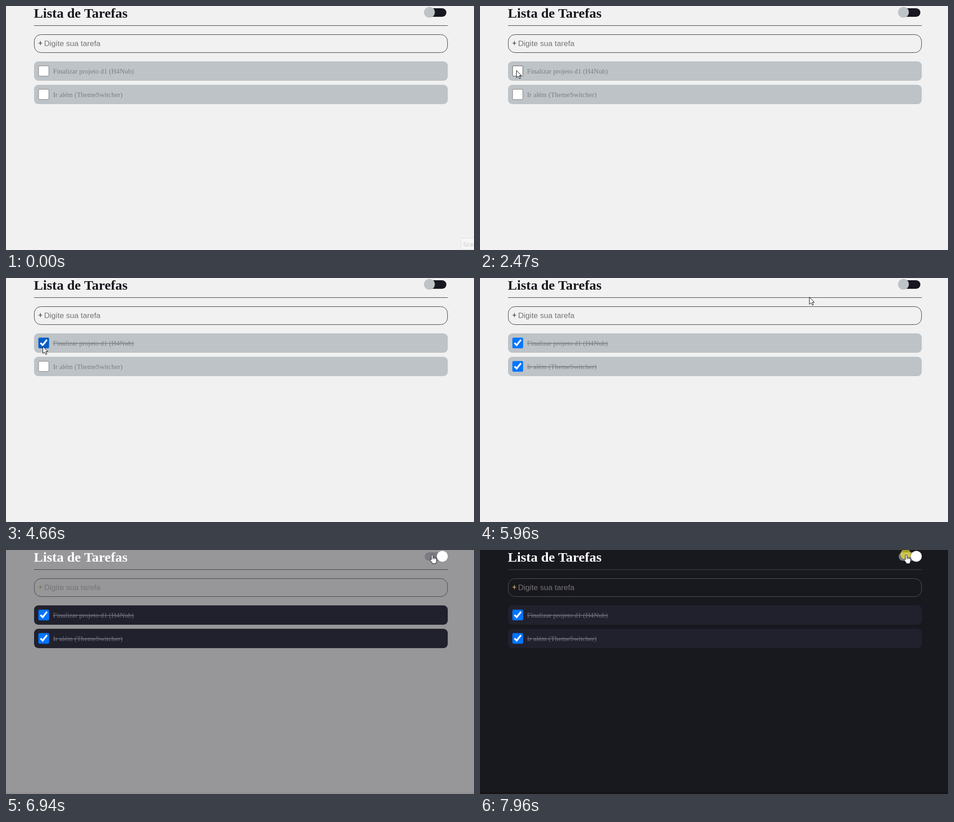
Animation of 1034x542 px, one loop 8 s. Source, as an HTML page:

```html
<!DOCTYPE html>
<html lang="pt-BR">
<head>
<meta charset="utf-8">
<title>Lista de Tarefas</title>
<style>
  html, body { margin: 0; width: 100%; height: 100%; overflow: hidden; background: #f1f1f1; }
  svg { display: block; width: 1034px; height: 542px; }
  text { font-family: "Liberation Serif", "Times New Roman", serif; white-space: pre; }
  .sans { font-family: "Liberation Sans", Arial, sans-serif; }
  .hint { font-family: "Open Sans", sans-serif; }
</style>
</head>
<body>
<svg viewBox="0 0 1034 542">
  <rect id="page" width="1034" height="542"/>
  <rect id="edge" y="538" width="1034" height="4" fill="#131318"/>
  <text id="title" x="61.5" y="26" font-size="30.4" font-weight="bold">Lista de Tarefas</text>
  <rect id="rule" x="62" y="43" width="914" height="1"/>
  <rect id="track" x="925" y="5" width="48" height="19" rx="9.5"/>
  <circle id="knob" cy="14" r="12"/>
  <rect id="field" x="62.5" y="63.5" width="913" height="40" rx="15" fill="none"/>
  <text id="plus" x="71" y="88" font-size="17.1" stroke-width=".4">+</text>
  <text class="sans" x="84.2" y="88.5" font-size="17.1" fill="#757575">Digite sua tarefa</text>
  <g id="rows"></g>
  <g id="hint">
    <rect x="1005.5" y="515.5" width="40" height="26" fill="#f6f6f6" stroke="#dedede"/>
    <text class="hint" x="1010.5" y="534" font-size="12" fill="#c4c4c4">Grav</text>
  </g>
  <circle id="press" r="11.5" fill="#fff228" fill-opacity=".62"/>
  <g id="cursor" stroke="#000" stroke-linejoin="round">
    <path id="arrow" d="M.5.5V16.5L4.3 13 7 18.6 9.4 17.5 6.8 12H11.6Z"/>
    <path id="hand" fill="#fff" d="M-.2 12.2V2.5Q1.5-.8 3.3 2.5V7Q5.5 6 6.2 7.7 8.2 7 8.9 8.6 11.4 8.2 11.4 10.4V14.5Q11.4 17 9.8 19V20.8H1.6V19L-3.3 12.5Q-3.4 9-.2 12.2ZM3.3 7V11M6.2 8V11M8.9 9V11"/>
  </g>
</svg>
<script>
const LOOP = 8000, PRESS = 170, RELEASE = 130;
const $ = id => document.getElementById(id);
const set = (el, attrs) => { for (const k in attrs) el.setAttribute(k, attrs[k]); };
const show = (el, on) => el.setAttribute('visibility', on ? 'visible' : 'hidden');
const clamp = v => Math.min(1, Math.max(0, v));
const mix = (a, b, p) => a + (b - a) * p;
const blend = (a, b, p) => `rgb(${a.map((v, i) => Math.round(mix(v, b[i], p)))})`;
const smooth = u => u * u * (3 - 2 * u);
const slowDown = u => 1 - (1 - u) ** 2;

// CSS "ease": cubic-bezier(.25, .1, .25, 1), solved by bisection
function ease(x) {
  if (x <= 0 || x >= 1) return clamp(x);
  let lo = 0, hi = 1, s;
  for (let i = 0; i < 20; i++) {
    s = (lo + hi) / 2;
    if (.75 * s * (1 - s) + s ** 3 < x) lo = s; else hi = s;
  }
  return .3 * s * (1 - s) ** 2 + 3 * s * s * (1 - s) + s ** 3;
}

const entry = { x: 1030, y: 500 };
const list = { x: 108, y: 95 };
const first = { x: 80, y: 142, clicks: [1590, 2270, 4330] };
const second = { x: 86, y: 200, clicks: [2860, 3480, 5200] };
const toggle = { x: 940, y: 9.5, clicks: [6558, 7960] };
const targets = [first, second, toggle];
const THEME_START = toggle.clicks[0] + RELEASE;

// Each move starts where the last one ended; bow bends its path
const moves = [
  { from: 70, until: 830, to: list },
  { from: 830, until: 1390, to: first, bowX: -32 },
  { from: 2450, until: 2800, to: second },
  { from: 3660, until: 4240, to: first, bowY: -30 },
  { from: 4520, until: 5070, to: second },
  { from: 5400, until: 6520, to: toggle, bowY: -15, pace: slowDown }
];

function pointer(t) {
  let { x, y } = entry;
  for (const { from, until, to, bowX = 0, bowY = 0, pace = smooth } of moves) {
    const u = clamp((t - from) / (until - from)), bow = Math.sin(Math.PI * u);
    x = mix(x, to.x, pace(u)) + bowX * bow;
    y = mix(y, to.y, pace(u)) + bowY * bow;
  }
  return { x, y };
}

const isPressed = t => targets.some(p => p.clicks.some(c => t >= c && t < c + PRESS));
const isOn = (target, t) => target.clicks.filter(c => t >= c + RELEASE).length % 2 === 1;

const rows = [
  { top: 123, label: 'Finalizar projeto d1 (H4Nub)', target: first },
  { top: 175, label: 'Ir além (ThemeSwitcher)', target: second }
];
for (const row of rows) {
  const g = document.createElementNS('http://www.w3.org/2000/svg', 'g');
  g.setAttribute('transform', `translate(62 ${row.top})`);
  g.innerHTML = `<rect width="914" height="43" rx="9.5"/>
    <rect x="10" y="10" width="22.75" height="22.75" rx="2"/>
    <path d="M14.25 21.4L19 26.1 28.5 14.25" fill="none" stroke="#fff" stroke-width="3.8"/>
    <text x="42" y="27" font-size="15.2">${row.label}</text>`;
  $('rows').append(g);
  [row.card, row.box, row.tick, row.text] = g.children;
}

function drawRow(row, t, { x, y }, pressed, dark) {
  const checked = isOn(row.target, t);
  const hover = Math.abs(x - 83) < 12 && Math.abs(y - row.top - 21.5) < 12;
  const blue = !hover ? '#0075ff' : pressed ? '#3793ff' : '#005cc8';
  const border = hover ? '#4f4f4f' : '#767676';
  set(row.card, { fill: dark ? '#21212d' : '#bdc3c7' });
  set(row.box, { fill: checked ? blue : '#fff', stroke: checked ? blue : border });
  show(row.tick, checked);
  set(row.text, {
    fill: dark ? '#72727e' : '#777f80',
    'text-decoration': checked ? 'line-through' : 'none'
  });
}

function draw(t) {
  const dark = isOn(toggle, t);
  const fade = ease((t - THEME_START) / 1000);
  const slide = ease((t - THEME_START) / 250);
  const at = pointer(t), pressed = isPressed(t);
  const overSwitch = at.x > 923 && at.y < 27;
  const ink = [23, 24, 31], white = [255, 255, 255];
  const plus = blend(ink, [255, 226, 120], fade);

  set($('page'), { fill: blend([241, 241, 241], [24, 24, 31], fade) });
  set($('edge'), { opacity: fade ** 4 });
  set($('title'), { fill: dark ? '#fff' : '#17181f' });
  set($('rule'), { fill: blend([48, 48, 52], [68, 68, 72], fade) });
  set($('field'), { stroke: blend([48, 48, 52], [88, 88, 92], fade) });
  set($('plus'), { fill: plus, stroke: plus });
  set($('track'), { fill: blend(ink, [123, 123, 131], slide) });
  set($('knob'), { cx: mix(935.5, 964, slide), fill: blend([189, 195, 199], white, slide) });
  for (const row of rows) drawRow(row, t, at, pressed, dark);

  set($('hint'), { opacity: 1 - clamp((t - 70) / 150) });
  set($('cursor'), { transform: `translate(${at.x} ${at.y})` });
  show($('arrow'), t >= 70 && !overSwitch);
  show($('hand'), overSwitch);
  set($('arrow'), { fill: pressed ? '#ffff9a' : '#fff' });
  show($('press'), pressed);
  set($('press'), { cx: at.x + .5, cy: at.y });
}

const start = performance.now();
function tick() {
  draw((performance.now() - start) % LOOP);
  requestAnimationFrame(tick);
}
tick();
</script>
</body>
</html>
```
